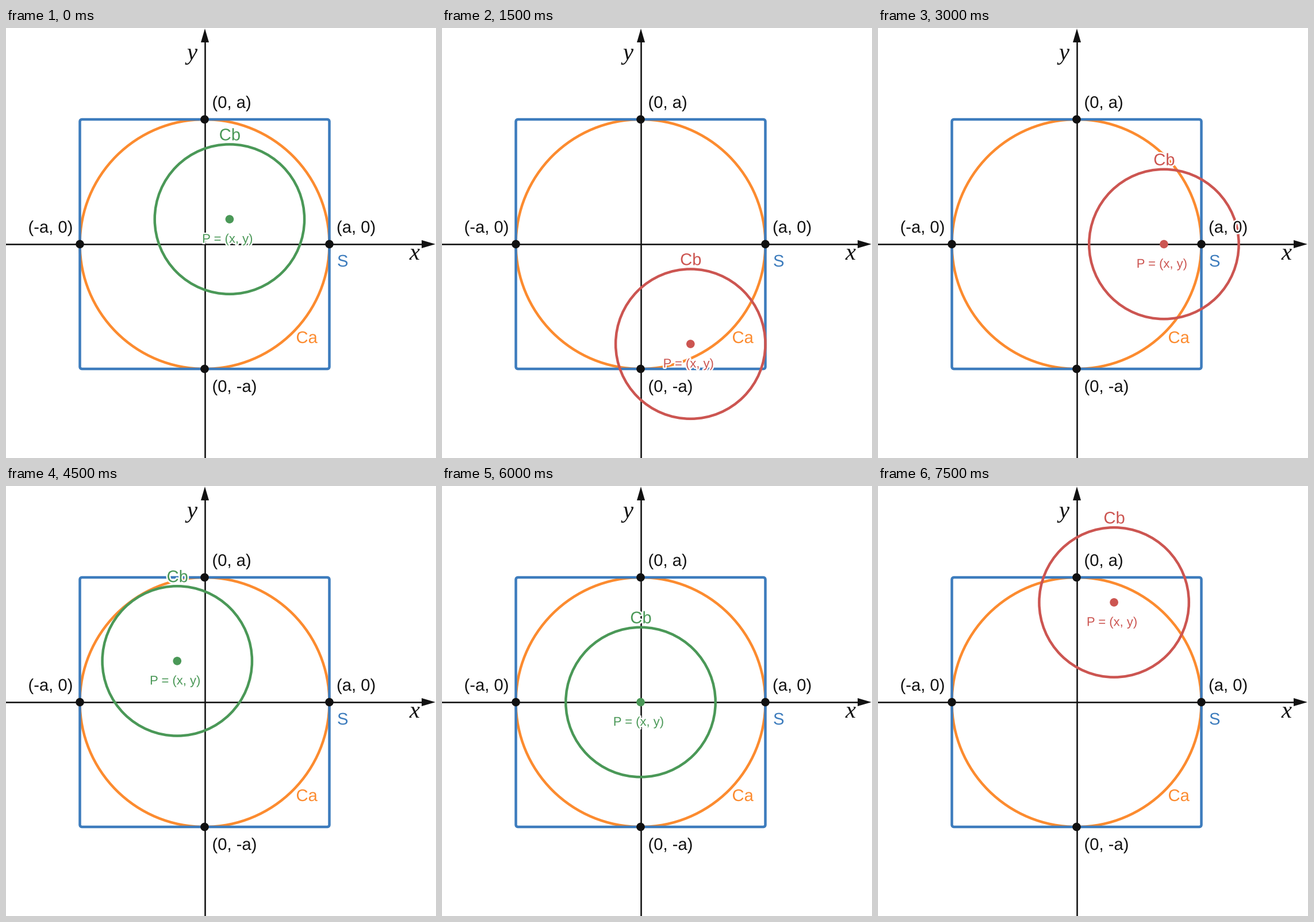
A matplotlib script for the animation above (8 s loop, 748 by 748 pixels).

```python
import matplotlib.pyplot as plt
from matplotlib.animation import FuncAnimation
from matplotlib.patches import Circle, FancyBboxPatch, Polygon
from matplotlib.patheffects import withStroke

SIZE, DPI = 748, 100
PX = 72 / DPI                      # points per pixel
CX, CY, A = 345.5, 376, 217        # origin and half side of the square
B = 0.6 * A                        # radius of the moving circle
STEP, FRAMES, HOLD = 500, 16, 3    # ms per frame, frames per loop, frames per pose

BLACK, BLUE, ORANGE = "#111111", "#3d7cbd", "#fc8b2f"
GREEN, RED = "#4a9857", "#cc5551"

# Centre of the moving circle in units of a; green when it lies inside Ca
POSES = [
    (0.2, 0.2, GREEN),
    (0.4, -0.8, RED),
    (0.7, 0, RED),
    (-0.22, 0.33, GREEN),
    (0, 0, GREEN),
    (0.3, 0.8, RED),
]

fig = plt.figure(figsize=(SIZE / DPI, SIZE / DPI), dpi=DPI, facecolor="white")
ax = fig.add_axes([0, 0, 1, 1])
ax.set_xlim(0, SIZE)
ax.set_ylim(SIZE, 0)
ax.axis("off")


def label(x, y, text, color=BLACK, size=29.2, ha="left", **font):
    font = {"family": "Liberation Sans", **font}
    halo = [withStroke(linewidth=5 * PX, foreground="white")]
    return ax.text(x, y, text, color=color, fontsize=size * PX, ha=ha,
                   va="baseline", zorder=6, path_effects=halo, **font)


def ring(x, y, r, color, z):
    return ax.add_patch(Circle((x, y), r, fill=False, ec=color,
                               lw=4.5 * PX, zorder=z))


def dot(x, y, color, z):
    return ax.add_patch(Circle((x, y), 7.3, fc=color, lw=0, zorder=z))


def arrow(*points):
    ax.add_patch(Polygon(points, fc=BLACK, lw=0, zorder=1))


# Axes
axis_style = dict(color=BLACK, lw=2.6 * PX, zorder=1)
ax.plot([0, 730], [CY, CY], **axis_style)
ax.plot([CX + 0.5, CX + 0.5], [20, SIZE], **axis_style)
arrow((747, CY), (723, CY - 7), (723, CY + 7))
arrow((CX + 0.5, 1), (CX - 6.5, 25), (CX + 7.5, 25))
for x, y, name in [(324, 55, "y"), (711, 403, "x")]:
    label(x, y, name, size=41, ha="center", family="Liberation Serif",
          style="italic")

# Fixed circle and square
ring(CX, CY, A, ORANGE, 2)
ax.add_patch(FancyBboxPatch((CX - A, CY - A), 2 * A, 2 * A,
                            boxstyle="round,pad=0,rounding_size=4", fill=False,
                            ec=BLUE, lw=4.5 * PX, zorder=2.5))
for dx, dy in [(1, 0), (-1, 0), (0, 1), (0, -1)]:
    dot(CX + dx * A, CY + dy * A, BLACK, 5)

label(358.5, 139, "(0, a)")
label(358.5, 633, "(0, -a)")
label(38.5, 356, "(-a, 0)")
label(575, 356, "(a, 0)")
label(576, 415, "S", BLUE)
label(504.5, 548, "Ca", ORANGE)

# Moving circle with its centre and labels
circle = ring(CX, CY, B, GREEN, 3)
centre = dot(CX, CY, GREEN, 5.5)
name_b = label(CX, CY, "Cb", GREEN, ha="center")
name_p = label(CX, CY, "P = (x, y)", GREEN, size=22, ha="center")


def update(i):
    u, v, color = POSES[i // HOLD]
    x, y = CX + u * A, CY - v * A
    circle.center = centre.center = (x, y)
    circle.set_edgecolor(color)
    centre.set_facecolor(color)
    name_b.set_position((x + 0.5, y - B - 7))
    name_p.set_position((x - 3.5, y + 41))
    for text in (name_b, name_p):
        text.set_color(color)
    return circle, centre, name_b, name_p


anim = FuncAnimation(fig, update, frames=FRAMES, init_func=lambda: update(0),
                     interval=STEP, repeat=True, repeat_delay=0)
plt.show()
```
